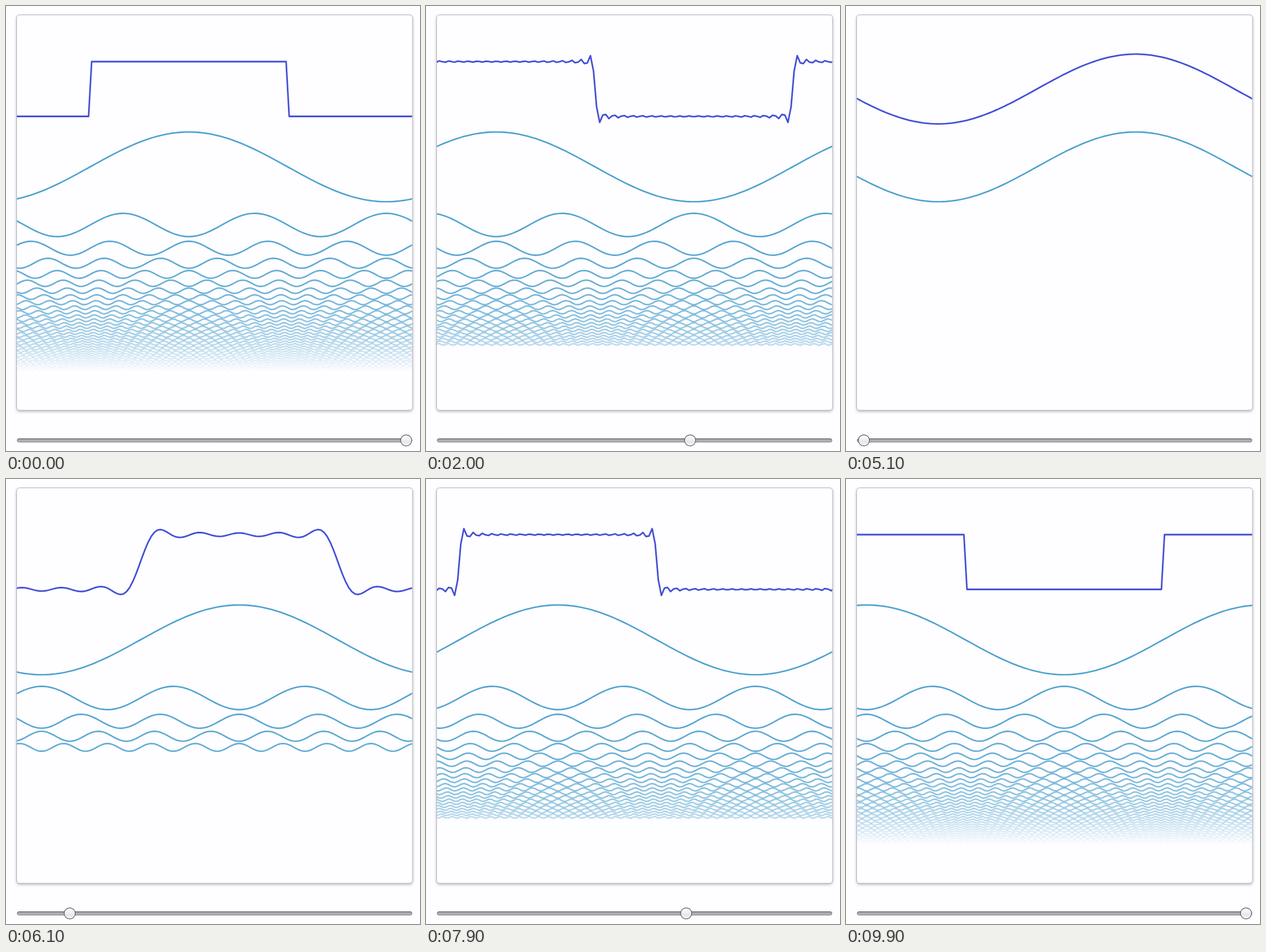
An HTML page with a canvas that plays this animation: 721 px wide and 776 px high, repeating every 10 s.

```html
<!DOCTYPE html>
<html lang="en">
<head>
<meta charset="utf-8">
<title>Fourier series of a square wave</title>
<style>
  html, body { margin: 0; width: 100%; height: 100%; overflow: hidden; background: #fefdff; }
  canvas { display: block; }
</style>
</head>
<body>
<canvas id="stage" width="721" height="776"></canvas>
<script>
const ctx = document.getElementById('stage').getContext('2d');

const LOOP = 10000, STEP = 100;
const LEFT = 19, RIGHT = 707.5, PERIOD = 688;
const SAMPLES = 128, TERMS = 32, DX = PERIOD / SAMPLES;
const HALF = 47.75, SUM_Y = 144.75, FIRST_Y = 280.5;
const KNOB_MIN = 30, KNOB_MAX = 697, TRACK_Y = 757.5;

// Crest position of the first harmonic over time: [ms, x]
const CRESTS = [[0, 318.5], [900, 231], [3200, 4], [5100, -183.5],
                [7000, -370.5], [8700, -536], [9900, -652]];

// Discrete Fourier terms of a square wave, stacked downwards
const terms = [];
for (let k = 0; k < TERMS; k++) {
  const n = 2 * k + 1;
  const size = HALF / (TERMS * Math.sin(n * Math.PI / SAMPLES));
  const prev = terms[k - 1];
  terms.push({
    n,
    size,
    amp: k % 2 ? -size : size,
    y: prev ? prev.y + 1.25 * (prev.size + size) : FIRST_Y,
    alpha: 1 - k / TERMS
  });
}

function crestAt(t) {
  let i = 1;
  while (i < CRESTS.length - 1 && t > CRESTS[i][0]) i++;
  const [t0, x0] = CRESTS[i - 1], [t1, x1] = CRESTS[i];
  return x0 + (x1 - x0) * (t - t0) / (t1 - t0);
}

function knobAt(t) {
  const mid = (KNOB_MIN + KNOB_MAX) / 2, reach = (KNOB_MAX - KNOB_MIN) / 2;
  return mid + reach * Math.cos(2 * Math.PI * (t + 33) / LOOP);
}

// The sample points travel with the wave, half a step off its crest
function plot(crest, y, fn) {
  const first = Math.floor((LEFT - crest) / DX) - 1;
  ctx.beginPath();
  for (let i = 0; i <= SAMPLES + 3; i++) {
    const j = first + i + 0.5;
    ctx.lineTo(crest + j * DX, y - fn(j * 2 * Math.PI / SAMPLES));
  }
  ctx.stroke();
}

function box(x, y, w, h, r) {
  ctx.beginPath();
  ctx.roundRect(x, y, w, h, r);
}

function shade(y0, y1, colors) {
  const g = ctx.createLinearGradient(0, y0, 0, y1);
  colors.forEach((c, i) => g.addColorStop(i / (colors.length - 1), c));
  return g;
}

function drawPanel() {
  ctx.save();
  ctx.shadowColor = 'rgba(0,0,0,0.3)';
  ctx.shadowBlur = 5;
  ctx.shadowOffsetY = 2;
  ctx.fillStyle = '#fefdff';
  box(18.5, 15.5, 689.5, 689.5, 5);
  ctx.fill();
  ctx.restore();
}

function drawBorder() {
  ctx.strokeStyle = '#b4b3b6';
  ctx.lineWidth = 1;
  box(18.5, 15.5, 689.5, 689.5, 5);
  ctx.stroke();
}

function drawWaves(crest, count) {
  const used = terms.slice(0, count);
  ctx.save();
  ctx.beginPath();
  ctx.rect(LEFT, 16, RIGHT - LEFT, 689);
  ctx.clip();
  ctx.lineJoin = 'round';
  ctx.lineWidth = 2.6;
  for (const { n, amp, y, alpha } of used) {
    ctx.strokeStyle = `rgba(78,162,207,${alpha})`;
    plot(crest, y, a => amp * Math.cos(n * a));
  }
  ctx.lineWidth = 2.8;
  ctx.strokeStyle = '#4450d4';
  plot(crest, SUM_Y, a => used.reduce((s, { n, amp }) => s + amp * Math.cos(n * a), 0));
  ctx.restore();
}

function drawSlider(x) {
  ctx.lineWidth = 1;
  ctx.fillStyle = shade(754, 761, ['#8b898c', '#b0aeb1', '#b9b7ba']);
  ctx.strokeStyle = shade(753, 761, ['#5f5d60', '#858386']);
  box(19.5, 754.5, 687.5, 6, 3);
  ctx.fill();
  ctx.stroke();

  ctx.beginPath();
  ctx.arc(x, TRACK_Y, 9.7, 0, 2 * Math.PI);
  ctx.fillStyle = shade(748, 767, ['#ffffff', '#f4f3f5', '#e6e5e8', '#fbfafc']);
  ctx.strokeStyle = '#59575a';
  ctx.lineWidth = 1.2;
  ctx.fill();
  ctx.stroke();
}

function draw(t) {
  const knob = knobAt(t);
  const share = (knob - KNOB_MIN) / (KNOB_MAX - KNOB_MIN);
  ctx.fillStyle = '#fefdff';
  ctx.fillRect(0, 0, 721, 776);
  drawPanel();
  drawWaves(crestAt(t), Math.round(1 + share * (TERMS - 1)));
  drawBorder();
  drawSlider(knob);
}

const start = performance.now();
function tick() {
  const t = (performance.now() - start) % LOOP;
  draw(Math.floor(t / STEP) * STEP);
  requestAnimationFrame(tick);
}
tick();
</script>
</body>
</html>
```
